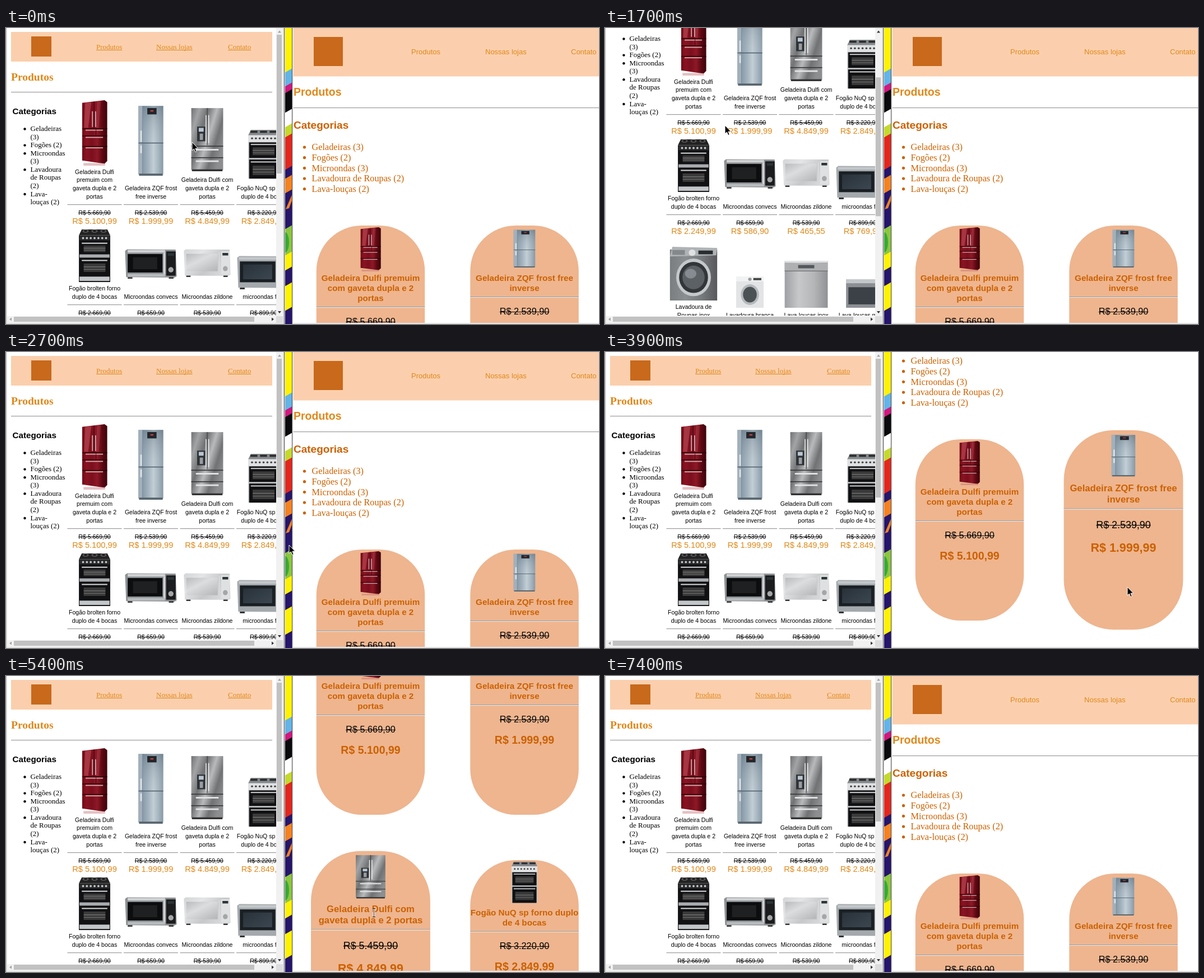
Recreate the animation shown at these times as an HTML page with a canvas. Size 1058 by 529 pixels, loop 7.9 s.

```html
<!DOCTYPE html>
<html lang="pt">
<head>
<meta charset="utf-8">
<title>Produtos</title>
<style>
html, body { margin: 0; width: 100%; height: 100%; overflow: hidden; background: #fff; }
canvas { display: block; }
</style>
</head>
<body>
<canvas id="stage" width="1058" height="529"></canvas>
<script>
const ctx = document.getElementById('stage').getContext('2d');
const LOOP = 7900, PEACH = '#fbcfad', ORANGE = '#e0881a', RUST = '#cc6100', CARD = '#eeb58f', LOGO = '#c8691c';

// ---------- drawing helpers ----------
function rect(x, y, w, h, color) { ctx.fillStyle = color; ctx.fillRect(x, y, w, h); }
function poly(points, color) {
  ctx.beginPath();
  points.forEach(p => ctx.lineTo(p[0], p[1]));
  ctx.closePath();
  ctx.fillStyle = color;
  ctx.fill();
}
function oval(x, y, rx, ry, color) {
  ctx.beginPath();
  ctx.ellipse(x, y, rx, ry, 0, 0, 7);
  ctx.fillStyle = color;
  ctx.fill();
}
function rule(x, y, w) { rect(x, y, w, 1, '#999'); rect(x, y + 1, w, 1, '#eee'); }
// gradient across the 100 x 100 box, towards (x, y)
function blend(x, y, ...colors) {
  const g = ctx.createLinearGradient(0, 0, x, y);
  colors.forEach((c, i) => g.addColorStop(i / (colors.length - 1), c));
  return g;
}
const across = (...colors) => blend(100, 0, ...colors);
// y is the middle of the capitals; line draws a stroke at that offset from y
function text(s, x, y, size, color, { bold, serif, center, line } = {}) {
  ctx.font = `${bold ? 'bold ' : ''}${size}px ${serif ? '"Liberation Serif", serif' : '"Liberation Sans", sans-serif'}`;
  ctx.fillStyle = color;
  const w = ctx.measureText(s).width, left = center ? x - w / 2 : x;
  ctx.fillText(s, left, Math.round(y + size * 0.35));
  if (line !== undefined) ctx.fillRect(left, Math.round(y + line), w, 1);
}
function clip(x, y, w, h, draw) {
  ctx.save();
  ctx.beginPath();
  ctx.rect(x, y, w, h);
  ctx.clip();
  draw();
  ctx.restore();
}

// ---------- appliances, each drawn in a 100 x 100 box ----------
function oven(y, h) {
  rect(5, y, 90, h, '#111113');
  rect(16, y + h * 0.32, 68, h * 0.5, '#3a3a3b');
  rect(16, y + h * 0.5, 68, 1, '#8a8a8a');
  rect(16, y + h * 0.65, 68, 1, '#777');
  rect(10, y + h * 0.1, 80, 2.2, '#cfd1d3');
}
function knobs(y, n, color) {
  for (let i = 0; i < n; i++) oval(14 + i * 72 / (n - 1), y, 3.2, 2, color);
}
function microwave(body, glass, pad) {
  poly([[1, 6], [5, 1], [97, 2], [99, 92], [95, 96], [3, 95]], body);
  rect(6, 95, 9, 5, '#333');
  rect(84, 95, 9, 5, '#333');
  rect(6, 17, 66, 62, glass);
  rect(79, 8, 18, 82, pad);
  rect(82, 14, 12, 9, '#2c3436');
  oval(88, 70, 5, 9, '#a4a6a8');
  rect(74, 12, 3, 74, '#d6d8da');
}
const art = {
  redFridge() {
    poly([[3, 4], [88, 0], [98, 3], [98, 93], [88, 97], [3, 92]], across('#6d0a16', '#8a1322', '#7a0f1d', '#8e1826', '#5c0812', '#38040a'));
    poly([[14, 4], [38, 3], [26, 42], [10, 42]], 'rgba(225,120,130,.35)');
    poly([[60, 2], [74, 1], [66, 42], [56, 42]], 'rgba(225,120,130,.2)');
    rect(47, 2, 2, 41, '#2c0307');
    rect(40, 17, 4, 24, '#c9a3a6');
    rect(52, 17, 4, 24, '#c9a3a6');
    [43, 54, 70].forEach(y => { rect(3, y, 95, 1.3, '#2b0307'); rect(16, y + 2, 66, 1.6, '#d7a5a9'); });
    rect(55, 43, 1.5, 11, '#2b0307');
    rect(8, 96, 82, 4, 'rgba(190,100,105,.4)');
  },
  tallFridge() {
    rect(2, 1, 96, 97, across('#93a4b0', '#8b9dab', '#a3b3be', '#c3ced5', '#a5b4bf', '#8496a3'));
    rect(18, 1, 80, 52, blend(0, 60, 'rgba(90,108,122,.5)', 'rgba(200,212,220,.1)'));
    rect(1, 1, 17, 97, '#a2b0bb');
    rect(17, 1, 1.5, 97, '#6d7f8c');
    rect(36, 4, 36, 9, '#22262b');
    rect(48, 7, 12, 2, '#b44');
    rect(2, 53, 96, 1.2, '#4d5d69');
    rect(9, 36, 6, 16, '#dde4e8');
    rect(9, 57, 6, 11, '#dde4e8');
    rect(4, 97, 92, 3, '#59666f');
  },
  wideFridge() {
    rect(1, 1, 98, 97, blend(100, 60, '#6c6e70', '#a2a4a6', '#707274', '#b8babc', '#707274', '#8c8e90'));
    rect(49, 1, 2, 58, '#3b3d3f');
    rect(19, 30, 25, 23, '#2f3337');
    rect(24, 32, 15, 6, '#b9c6d0');
    rect(27, 41, 10, 10, '#9a9ea2');
    rect(45, 12, 3, 44, '#e2e2e2');
    rect(53, 12, 3, 44, '#e2e2e2');
    [60, 78].forEach(y => { rect(1, y, 98, 1.5, '#38393b'); rect(15, y + 5, 70, 2.5, '#e3e4e5'); });
    rect(3, 97, 94, 3, '#333');
  },
  stove() {
    poly([[10, 1], [90, 1], [98, 12], [2, 12]], '#85898c');
    [20, 50, 80].forEach(x => rect(x - 11, 3, 22, 4, '#2a2a2a'));
    rect(2, 12, 96, 13, '#dfe1e3');
    knobs(18, 7, '#444');
    rect(2, 25, 96, 73, '#c3c6c8');
    oven(26, 31);
    oven(60, 38);
  },
  doubleOven() {
    poly([[10, 2], [90, 2], [99, 13], [1, 13]], '#222');
    [22, 50, 78].forEach(x => { oval(x, 5, 10, 3, '#555'); oval(x, 5, 5, 1.5, '#111'); });
    rect(1, 13, 98, 86, '#131315');
    rect(2, 14, 96, 8, '#2b2c2e');
    knobs(18, 7, '#c7c9cb');
    oven(24, 24);
    rect(3, 48, 94, 6, '#a9acaf');
    oven(55, 31);
    rect(3, 89, 94, 8, '#c3c6c8');
  },
  darkMicrowave() {
    microwave('#8d9092', '#0c0d0e', '#1b1c1e');
    rect(6, 3, 71, 9, '#d0d2d4');
    rect(6, 84, 71, 9, '#b9bcbe');
    rect(16, 28, 46, 40, '#1f2021');
  },
  whiteMicrowave() {
    microwave(blend(100, 60, '#d3d4d5', '#e4e5e6', '#c6c8c9', '#d9dadb'), blend(70, 80, '#a9abac', '#dcddde', '#b3b5b6'), '#dfe0e1');
  },
  greyMicrowave() {
    microwave('#a4a9ad', '#1a1f24', '#92979b');
    rect(12, 26, 54, 44, blend(70, 70, '#22292f', '#3c4852'));
    rect(4, 4, 73, 8, '#c3c7ca');
  },
  washer() {
    rect(1, 5, 98, 95, across('#7a7d80', '#8b8e91', '#777a7d', '#55575a'));
    poly([[6, 0], [99, 2], [97, 16], [1, 18]], '#b0b3b6');
    rect(6, 6, 26, 9, '#85888b');
    oval(47, 11, 7, 6, '#dfe1e3');
    rect(60, 7, 30, 7, '#2a2d30');
    oval(50, 57, 36, 35, '#c5c8cb');
    oval(50, 57, 30, 29, '#333639');
    oval(50, 57, 23, 22, '#5c6166');
    oval(44, 50, 12, 9, '#858b90');
  },
  smallWasher() {
    rect(2, 0, 96, 100, '#e3e4e6');
    rect(2, 0, 96, 16, '#f1f2f3');
    oval(50, 9, 6, 5, '#999');
    rect(62, 5, 28, 7, '#444');
    oval(50, 58, 32, 33, '#b6babd');
    oval(50, 58, 24, 25, '#4c5156');
  },
  dishwasher() {
    rect(2, 0, 96, 100, across('#9b9da0', '#c6c8ca', '#b4b6b8', '#8d8f92'));
    rect(2, 0, 96, 4, '#e2e3e4');
    rect(2, 5, 96, 16, '#aeb0b2');
    rect(32, 9, 36, 7, '#55585b');
    rect(2, 21, 96, 1.5, '#6b6d70');
  },
  counterWasher() {
    rect(1, 0, 98, 100, '#8c9095');
    rect(1, 0, 98, 14, '#c4c7ca');
    rect(8, 28, 84, 60, '#3c4147');
  }
};
function picture(kind, x, y, w, h) {
  ctx.save();
  ctx.translate(x, y);
  ctx.scale(w / 100, h / 100);
  art[kind]();
  ctx.restore();
}

// ---------- catalogue ----------
// box: width, top, bottom of the picture in the list page; card: the same inside a card
const item = (kind, box, lines, was, now, cardLines, card) => ({ kind, box, lines, was, now, cardLines, card });
const rows = [
  [301, [
    item('redFridge', [47, 129, 246], ['Geladeira Dulfi', 'premuim com', 'gaveta dupla e 2', 'portas'], '5.669,90', '5.100,99',
      ['Geladeira Dulfi premuim', 'com gaveta dupla e 2', 'portas'], [38, 3, 82]),
    item('tallFridge', [46, 138, 264], ['Geladeira ZQF frost', 'free inverse'], '2.539,90', '1.999,99',
      ['Geladeira ZQF frost free', 'inverse'], [40, 7, 75]),
    item('wideFridge', [58, 142, 256], ['Geladeira Dulfi com', 'gaveta dupla e 2', 'portas'], '5.459,90', '4.849,99',
      ['Geladeira Dulfi com', 'gaveta dupla e 2 portas'], [49, 6, 77]),
    item('stove', [57, 181, 271], ['Fogão NuQ sp forno', 'duplo de 4 bocas'], '3.220,90', '2.849,99',
      ['Fogão NuQ sp forno duplo', 'de 4 bocas'], [48, 2, 78])
  ]],
  [480, [
    item('doubleOven', [57, 358, 455], ['Fogão brolten forno', 'duplo de 4 bocas'], '2.669,90', '2.249,99'),
    item('darkMicrowave', [94, 395, 448], ['Microondas convecs'], '659,90', '586,90'),
    item('whiteMicrowave', [85, 395, 445], ['Microondas zildone'], '539,90', '465,55'),
    item('greyMicrowave', [96, 407, 467], ['microondas fino'], '899,90', '769,90')
  ]],
  [674, [
    item('washer', [86, 552, 648], ['Lavadoura de', 'Roupas inox'], '2.899,90', '2.519,99'),
    item('smallWasher', [51, 605, 661], ['Lavadoura branca'], '1.699,90', '1.459,99'),
    item('dishwasher', [80, 577, 661], ['Lava-louças inox'], '2.799,90', '2.399,99'),
    item('counterWasher', [60, 610, 661], ['Lava-louças mesa'], '1.899,90', '1.639,99')
  ]]
];
const featured = rows[0][1];

// ---------- motion ----------
const leftScroll = [[800, 0], [1300, 114], [1600, 182], [2000, 97], [2400, 0]];
const rightScroll = [[3800, 0], [3900, 197], [4000, 214], [4200, 214], [4700, 429], [5500, 429], [5600, 322],
  [5700, 322], [5900, 260], [6000, 260], [6100, 214], [6200, 214], [6300, 156], [6400, 107], [6500, 107], [6600, 0]];
const pointer = [[500, 332, 204], [600, 213, 165], [1600, 213, 165], [1700, 214, 174], [2500, 214, 174], [2800, 650, 430],
  [3800, 650, 430], [3900, 932, 420], [4200, 932, 420], [4700, 852, 426], [4800, 852, 426], [4900, 794, 426],
  [5000, 794, 426], [5200, 649, 414], [5500, 649, 414], [6300, 655, 397], [6500, 655, 397], [6600, 660, 407],
  [7000, 660, 407], [7100, 622, 305]];
const hovers = [[0, -1], [2800, 0], [3900, 1], [4300, -1], [4600, 3], [5100, -1], [5200, 2], [5600, -1], [5900, 0], [7400, -1]];

function at(keys, t, i = 1) {
  const n = keys.findIndex(k => k[0] >= t);
  if (n < 0) return keys[keys.length - 1][i];
  if (n === 0) return keys[0][i];
  const a = keys[n - 1], b = keys[n];
  return Math.round(a[i] + (b[i] - a[i]) * (t - a[0]) / (b[0] - a[0]));
}
const latest = (keys, t) => keys.filter(k => k[0] <= t).pop()[1];

// ---------- left window ----------
function product(p, cx, lastLine) {
  const [w, top, bottom] = p.box, center = true;
  picture(p.kind, cx - w / 2, top, w, bottom - top);
  p.lines.forEach((s, i) => text(s, cx, lastLine - (p.lines.length - 1 - i) * 14.6, 10.56, '#000', { center }));
  rule(cx - 48.5, lastLine + 14, 97);
  text('R$ ' + p.was, cx, lastLine + 29, 10.56, '#000', { center, line: 0 });
  text('R$ ' + p.now, cx, lastLine + 44, 14.6, ORANGE, { center });
}
function listPage() {
  const serif = true;
  rect(9, 7, 466, 53, PEACH);
  rect(45, 15, 36, 36, LOGO);
  [['Produtos', 161], ['Nossas lojas', 268], ['Contato', 396]].forEach(([s, x]) =>
    text(s, x, 33, 13, ORANGE, { serif, line: 6 }));
  text('Produtos', 9, 87, 19.5, ORANGE, { bold: true, serif });
  rule(9, 114, 466);
  text('Categorias', 11.5, 149, 15.2, '#000', { bold: true });
  ['•Geladeiras', '(3)', '•Fogões (2)', '•Microondas', '(3)', '•Lavadoura', 'de Roupas', '(2)', '•Lava-', 'louças (2)'].forEach((s, i) => {
    const y = 179.5 + i * 14.56;
    if (s[0] === '•') oval(33.5, y + 1, 2.2, 2.2, '#000');
    text(s.replace('•', ''), 43.5, y, 13, '#000', { serif });
  });
  rows.forEach(([lastLine, items]) => items.forEach((p, i) => product(p, 158 + i * 100.5, lastLine)));
}
function arrow(x, y, dx, dy, color) {
  poly([[x + dx * 2, y + dy * 2], [x - dx * 2 + dy * 3, y - dy * 2 + dx * 3], [x - dx * 2 - dy * 3, y - dy * 2 - dx * 3]], color);
}
function leftWindow(scroll) {
  rect(0, 0, 498, 529, '#e4e4e4');
  rect(0, 0, 1, 529, '#c8c8c8');
  rect(496, 0, 1, 529, '#555');
  rect(2, 0, 480, 515, '#fff');
  clip(3, 0, 479, 514, () => { ctx.translate(0, -scroll); listPage(); });
  rect(482, 0, 12, 515, '#f1f1f1');
  rect(2, 515, 480, 12, '#f1f1f1');
  rect(482, 515, 12, 12, '#dcdcdc');
  rect(483, 12 + scroll * 0.474, 9, 248, '#c1c1c1');
  rect(14, 516, 429, 9, '#c1c1c1');
  arrow(488, 6.5, 0, -1, scroll ? '#333' : '#a3a3a3');
  arrow(488, 508, 0, 1, '#333');
  arrow(8, 520.5, -1, 0, '#a3a3a3');
  arrow(476, 520.5, 1, 0, '#333');
}

// ---------- wallpaper between the windows: slanted bands, each running down to the next ----------
function wallpaper() {
  [[-20, '#fff200'], [76, '#63b4e8'], [101, '#d3177f'], [113, '#0a0a0c'], [148, '#fff'], [174, '#c5d92d'], [192, '#e3261d'],
    [250, '#25156b'], [266, '#f58220'], [292, '#25156b'], [356, '#8cc63f'], [403, '#fff200'], [430, '#25156b'],
    [458, '#fff200'], [502, '#25156b']].forEach(([y, color]) =>
    poly([[497, y + 4], [511, y - 4], [511, 529], [497, 529]], color));
  poly([[511, 296], [499, 324], [505, 322], [511, 306]], '#f58220');
  oval(498, 383, 7, 18, '#39a935');
}

// ---------- right window ----------
function card(p, cx, top, hovered) {
  const center = true, [w, a, b] = p.card;
  ctx.save();
  ctx.translate(cx, top + 162);
  if (hovered) ctx.scale(1.1, 1.1);
  ctx.translate(0, -162);
  ctx.beginPath();
  ctx.roundRect(-96.75, 0, 193.5, 324, 81);
  ctx.fillStyle = CARD;
  ctx.fill();
  picture(p.kind, -w / 2, a, w, b - a);
  p.cardLines.forEach((s, i) => text(s, 0, 93.5 + i * 18, 15.2, RUST, { bold: true, center }));
  const y = 91 + p.cardLines.length * 18;
  rule(-96.75, y, 193.5);
  text('R$ ' + p.was, 0, y + 26.5, 16.25, '#000', { center, line: 0 });
  text('R$ ' + p.now, 0, y + 63.5, 19.5, RUST, { bold: true, center });
  ctx.restore();
}
function cardPage(hover) {
  rect(513, 0, 545, 86.5, PEACH);
  rect(549, 16, 52, 52, LOGO);
  [['Produtos', 723], ['Nossas lojas', 855], ['Contato', 1008]].forEach(([s, x]) => text(s, x, 42.5, 13, ORANGE));
  text('Produtos', 513, 114, 19.5, ORANGE, { bold: true });
  rule(513, 142, 545);
  text('Categorias', 513, 173, 19, RUST, { bold: true });
  ['Geladeiras (3)', 'Fogões (2)', 'Microondas (3)', 'Lavadoura de Roupas (2)', 'Lava-louças (2)'].forEach((s, i) => {
    const y = 212.5 + i * 18.67;
    oval(532.5, y + 0.5, 2.6, 2.6, RUST);
    text(s, 545.5, y, 16.25, RUST, { serif: true });
  });
  featured.forEach((p, i) => card(p, i % 2 ? 925 : 650.5, 353 + (i >> 1) * 405, i === hover));
}
function rightWindow(scroll, hover) {
  rect(510, 0, 548, 529, '#e6e6e6');
  rect(510, 0, 1, 529, '#555');
  rect(513, 0, 545, 527, '#fff');
  clip(513, 0, 545, 527, () => { ctx.translate(0, -scroll); cardPage(hover); });
}

function drawPointer(x, y, beam) {
  if (beam) {
    [[3, '#fff'], [1, '#222']].forEach(([w, color]) => {
      rect(x + 7.5 - w / 2, y + 1, w, 16, color);
      rect(x + 5, y + 1, 5, 1, color);
      rect(x + 5, y + 16, 5, 1, color);
    });
    return;
  }
  poly([[0, 0], [0, 15], [3.4, 12], [5.8, 17.6], [8.2, 16.6], [5.9, 11.2], [10.6, 11]].map(([a, b]) => [x + a, y + b]), '#000');
  ctx.strokeStyle = '#fff';
  ctx.lineWidth = 1;
  ctx.stroke();
}

function frame(now) {
  const t = Math.floor(now % LOOP / 100) * 100;
  wallpaper();
  leftWindow(at(leftScroll, t));
  rightWindow(at(rightScroll, t), latest(hovers, t));
  if (t < 7400) drawPointer(at(pointer, t), at(pointer, t, 2), t >= 5400 && t < 5600);
  requestAnimationFrame(frame);
}
requestAnimationFrame(frame);
</script>
</body>
</html>
```
